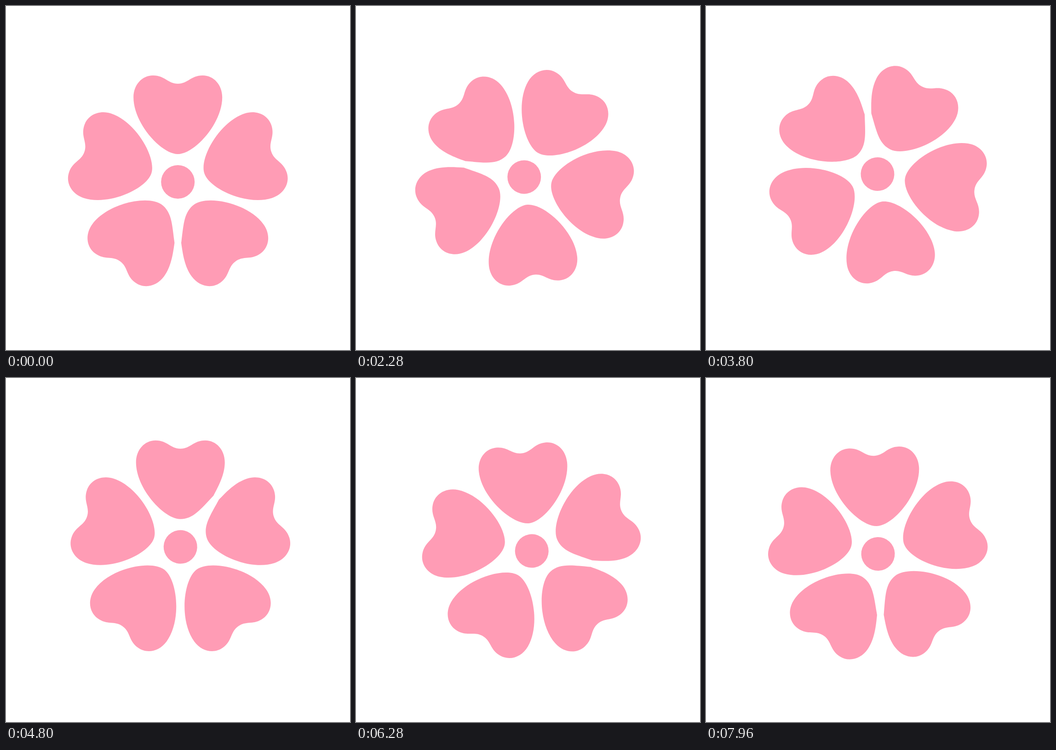
Recreate the animation shown at these times as an HTML page. Size 748x748 px, loop 8000 ms.

```html
<!DOCTYPE html>
<html lang="en">
<head>
<meta charset="utf-8">
<title>Turning blossom</title>
<style>
  html, body { margin: 0; width: 100%; height: 100%; overflow: hidden; background: #fff; }
  svg { display: block; width: 100vw; height: 100vh; }
</style>
</head>
<body>
<svg viewBox="0 0 748 748">
  <g id="flower" fill="#ff9cb5"><circle cx="373.7" cy="382.5" r="36.5"/></g>
</svg>
<script>
const LOOP = 8000, STEP = 40, FPS = 60, PETALS = 5;
const flower = document.getElementById('flower');

// Bezier points of half an upright petal, around the flower's centre
const lobe = [[0, -213.5], [22, -213.5], [28, -231.5], [54, -231.5], [78, -231.5], [96.5, -211], [96.5, -184]];
const tip = [0, -60.5];
const round = [...lobe, [96.5, -127], [36, -60.5], tip];
const pointed = [...lobe, [96.5, -158], [84, -134], [72, -111.5], [44, -82], [28, -60.5], tip];

// Joins a right half to a mirrored left half
function petalPath(right, left) {
  const back = left.map(([x, y]) => [-x, y]).reverse().slice(1);
  const [start, ...rest] = [...right, ...back];
  return `M${start}C${rest.join(' ')}Z`;
}

// The two lowest petals face each other with pointed sides
for (let k = 0; k < PETALS; k++) {
  const petal = document.createElementNS('http://www.w3.org/2000/svg', 'path');
  petal.setAttribute('d', petalPath(k === 2 ? pointed : round, k === 3 ? pointed : round));
  petal.setAttribute('transform', `translate(373.7 382.5) rotate(${360 * k / PETALS})`);
  flower.append(petal);
}

// One turn per loop at 60 poses a second, shown every 40 ms
function draw() {
  const t = Math.floor(performance.now() % LOOP / STEP) * STEP;
  const pose = Math.floor(t * FPS / 1000);
  flower.setAttribute('transform', `rotate(${360 * pose * 1000 / (FPS * LOOP)} 374 374)`);
  requestAnimationFrame(draw);
}
draw();
</script>
</body>
</html>
```
